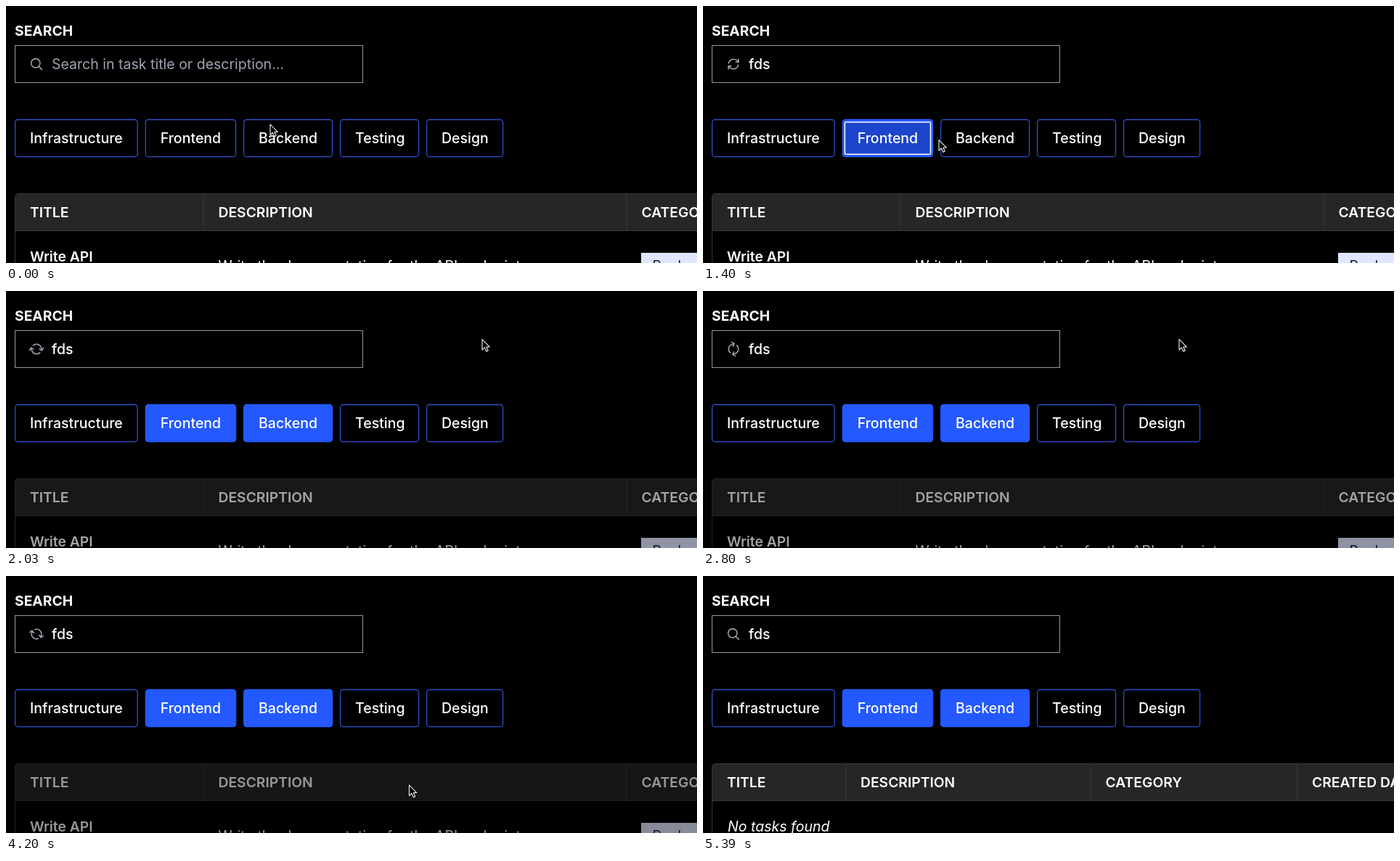
These frames come from a looping animation (952 by 354 pixels, 5.81 s). An HTML page:

```html
<!DOCTYPE html>
<html lang="en">
<head>
<meta charset="utf-8">
<title>Task search</title>
<style>
  html, body { margin: 0; width: 100%; height: 100%; overflow: hidden; background: #000; }
  svg { display: block; width: 952px; height: 354px; }
  text { font: 400 19.55px Inter, Roboto, sans-serif; fill: #fff; white-space: pre; }
  .bold { font-weight: 700; font-size: 19.3px; }
  .semi { font-weight: 600; font-size: 19.3px; }
  .medium { font-weight: 500; }
  .italic { font-style: italic; }
  .icon { fill: none; stroke: #9ca3af; stroke-width: 1.9; stroke-linecap: round; stroke-linejoin: round; }
  .line { fill: none; stroke: #303a47; }
</style>
</head>
<body>
<svg id="stage" viewBox="0 0 952 354" xmlns="http://www.w3.org/2000/svg">
  <rect width="952" height="354"/>
  <text class="bold" x="12" y="41">SEARCH</text>
  <rect id="field" x="12.5" y="54.5" width="479" height="51" fill="none" stroke="#989898"/>
  <rect id="ring" x="12" y="54" width="480" height="52" fill="none" stroke="#2458ff" stroke-width="2.4"/>
  <path id="lens" class="icon" transform="translate(42 80) scale(.82) translate(-12 -12)"
    d="m21 21-5.197-5.197m0 0A7.5 7.5 0 1 0 5.196 5.196a7.5 7.5 0 0 0 10.607 10.607Z"/>
  <path id="spinner" class="icon"
    d="M16.023 9.348h4.992v-.001M2.985 19.644v-4.992m0 0h4.992m-4.993 0 3.181 3.183a8.25 8.25 0 0 0 13.803-3.7M4.031 9.865a8.25 8.25 0 0 1 13.803-3.7l3.181 3.182m0-4.991v4.99"/>
  <text id="query" x="63" y="87"></text>
  <path id="caret" d="M0 69.500V91.500" stroke="#ddd" stroke-width="1.3"/>
  <path id="clear" d="M463 76l8 8m0-8l-8 8" stroke="#4a6fc0" stroke-width="2"/>
  <g id="chips"></g>
  <g id="tasks"></g>
  <g id="empty"></g>
  <path id="arrow" d="M0 0V15.300L3.600 12 6.100 17.600 8.600 16.500 6.200 11.100H10.900Z"
    fill="#000" stroke="#fff" stroke-width="1.1" stroke-linejoin="round"/>
  <path id="beam" d="M-3.500-9Q0-9 0-7Q0-9 3.500-9M0-7V7M-3.500 9Q0 9 0 7Q0 9 3.500 9"
    fill="none" stroke="#eee" stroke-width="1.3"/>
</svg>
<script>
const LOOP = 5810, STEP = 70;
const FOCUS = 490, TYPE = 910, PICK_FRONT = 1260, PICK_BACK = 1540, LOADED = 5180;
const PULSE_START = 1370, PULSE_HALF = 1050;
const SPIN_START = 890, SPIN_PERIOD = 1050;
const $ = id => document.getElementById(id);

function add(parent, tag, attrs, text) {
  const el = document.createElementNS("http://www.w3.org/2000/svg", tag);
  for (const key in attrs) el.setAttribute(key, attrs[key]);
  if (text) el.textContent = text;
  return parent.appendChild(el);
}

const set = (el, key, value) => el.setAttribute(key, value);
const show = (el, on) => set(el, "visibility", on ? "visible" : "hidden");
const clamp = v => Math.max(0, Math.min(1, v));

const chips = [
  ["Infrastructure", 12, 181.8], ["Frontend", 191.7, 317.2], ["Backend", 327, 450.2],
  ["Testing", 460, 569.2], ["Design", 579, 685.2]
].map(([name, left, right]) => {
  const width = right - left;
  const box = add($("chips"), "rect", {
    x: left + .6, y: 156.5, width: width - 1.2, height: 51.2, rx: 4, "stroke-width": 1.3
  });
  const inner = add($("chips"), "rect", {
    x: left + 3.7, y: 160, width: width - 7.4, height: 44.2, rx: 1.5,
    fill: "#1c45cc", stroke: "#fff", "stroke-width": 1.5
  });
  add($("chips"), "text", { x: left + 21, y: 189, class: "medium" }, name);
  return { box, inner };
});

function buildTable(group, columns) {
  add(group, "path", { d: "M12.500 354V263.500Q12.500 258.500 17.500 258.500H952V309.500H12.500", fill: "#262626" });
  add(group, "rect", { x: 13, y: 310, width: 939, height: 44, fill: "#000" });
  add(group, "path", { d: "M12.500 354V263.500Q12.500 258.500 17.500 258.500H952M12.500 309.500H952", class: "line" });
  columns.forEach(([name, x], i) => {
    if (i) add(group, "path", { d: `M${x - 20.5} 259V309`, class: "line" });
    add(group, "text", { x, y: 291, class: "semi" }, name);
  });
}

buildTable($("tasks"), [["TITLE", 33], ["DESCRIPTION", 292.5], ["CATEGORY", 875.5]]);
add($("tasks"), "text", { x: 33, y: 352, class: "semi" }, "Write API");
add($("tasks"), "text", { x: 292.5, y: 365 }, "Write the documentation for the API endpoints");
add($("tasks"), "rect", { x: 875, y: 340, width: 90, height: 40, fill: "#dfe7ff" });
add($("tasks"), "text", { x: 890.5, y: 365, style: "fill:#1d2540" }, "Backend");

buildTable($("empty"), [["TITLE", 33], ["DESCRIPTION", 217], ["CATEGORY", 554.5], ["CREATED DATE", 839]]);
add($("empty"), "text", { x: 34, y: 352, class: "italic" }, "No tasks found");

// Pointer stops: time, x, y
const path = [
  [0, 364, 163], [350, 256, 57], [1050, 256, 57], [1260, 262, 184], [1400, 325, 184.5],
  [1540, 372, 184], [1610, 385, 180], [1890, 652, 45], [2030, 656, 66.5],
  [3990, 656, 66.5], [4200, 555.5, 288], [4340, 520, 380]
];

function pointerAt(t) {
  const i = path.findIndex(stop => stop[0] > t);
  if (i < 0) return path[path.length - 1].slice(1);
  const [t0, x0, y0] = path[i - 1], [t1, x1, y1] = path[i];
  const k = (t - t0) / (t1 - t0);
  return [x0 + (x1 - x0) * k, y0 + (y1 - y0) * k];
}

// cubic-bezier(.4, 0, .6, 1)
function ease(x) {
  let lo = 0, hi = 1, p = .5;
  for (let i = 0; i < 20; i++) {
    p = (lo + hi) / 2;
    const q = 1 - p;
    if (1.2 * p * q * q + 1.8 * p * p * q + p * p * p < x) lo = p; else hi = p;
  }
  return p * p * (3 - 2 * p);
}

function pulse(t) {
  if (t < PULSE_START) return 1;
  const phase = (t - PULSE_START) / PULSE_HALF % 2;
  return 1 - .5 * ease(phase < 1 ? phase : 2 - phase);
}

function drawSearch(t) {
  const typed = "fds".slice(0, t < TYPE ? 0 : 1 + Math.floor((t - TYPE) / STEP));
  const focused = t >= FOCUS && t < PICK_FRONT;
  const busy = t >= TYPE && t < LOADED;
  $("query").textContent = typed || "Search in task title or description...";
  $("query").style.fill = typed ? "#fff" : "#9ca3af";
  set($("query"), "class", typed ? "medium" : "");
  const caretX = 63.5 + (typed ? $("query").getComputedTextLength() : 0);
  set($("caret"), "transform", `translate(${caretX} 0)`);
  show($("caret"), focused);
  show($("ring"), focused);
  set($("ring"), "opacity", clamp((t - FOCUS + STEP) / 280));
  show($("clear"), focused && typed);
  show($("lens"), !busy);
  show($("spinner"), busy);
  const angle = (t - SPIN_START) / SPIN_PERIOD * 360;
  set($("spinner"), "transform", `translate(42 80) rotate(${angle}) scale(.82) translate(-12 -12)`);
}

function drawChips(t) {
  const picks = { 1: [PICK_FRONT, PICK_BACK], 2: [PICK_BACK, PICK_BACK + 3 * STEP] };
  chips.forEach(({ box, inner }, i) => {
    const [from, to] = picks[i] || [Infinity, 0];
    const on = t >= from;
    set(box, "fill", on ? "#2459ff" : "#000");
    set(box, "stroke", on ? "#2459ff" : "#2c4fcb");
    show(inner, on && t < to);
  });
}

function drawPointer(t) {
  const [x, y] = pointerAt(t);
  const visible = (t < TYPE || t >= 1120) && t < 4340;
  const overField = x > 12 && x < 492 && y > 54 && y < 106;
  for (const id of ["arrow", "beam"]) {
    show($(id), visible && overField === (id === "beam"));
    set($(id), "transform", `translate(${x} ${y}) scale(.95)`);
  }
}

function draw(t) {
  drawSearch(t);
  drawChips(t);
  show($("tasks"), t < LOADED);
  show($("empty"), t >= LOADED);
  set($("tasks"), "opacity", pulse(t));
  drawPointer(t);
}

const start = performance.now();
function tick() {
  const t = (performance.now() - start) % LOOP;
  draw(Math.floor(t / STEP) * STEP);
  requestAnimationFrame(tick);
}
tick();
</script>
</body>
</html>
```
